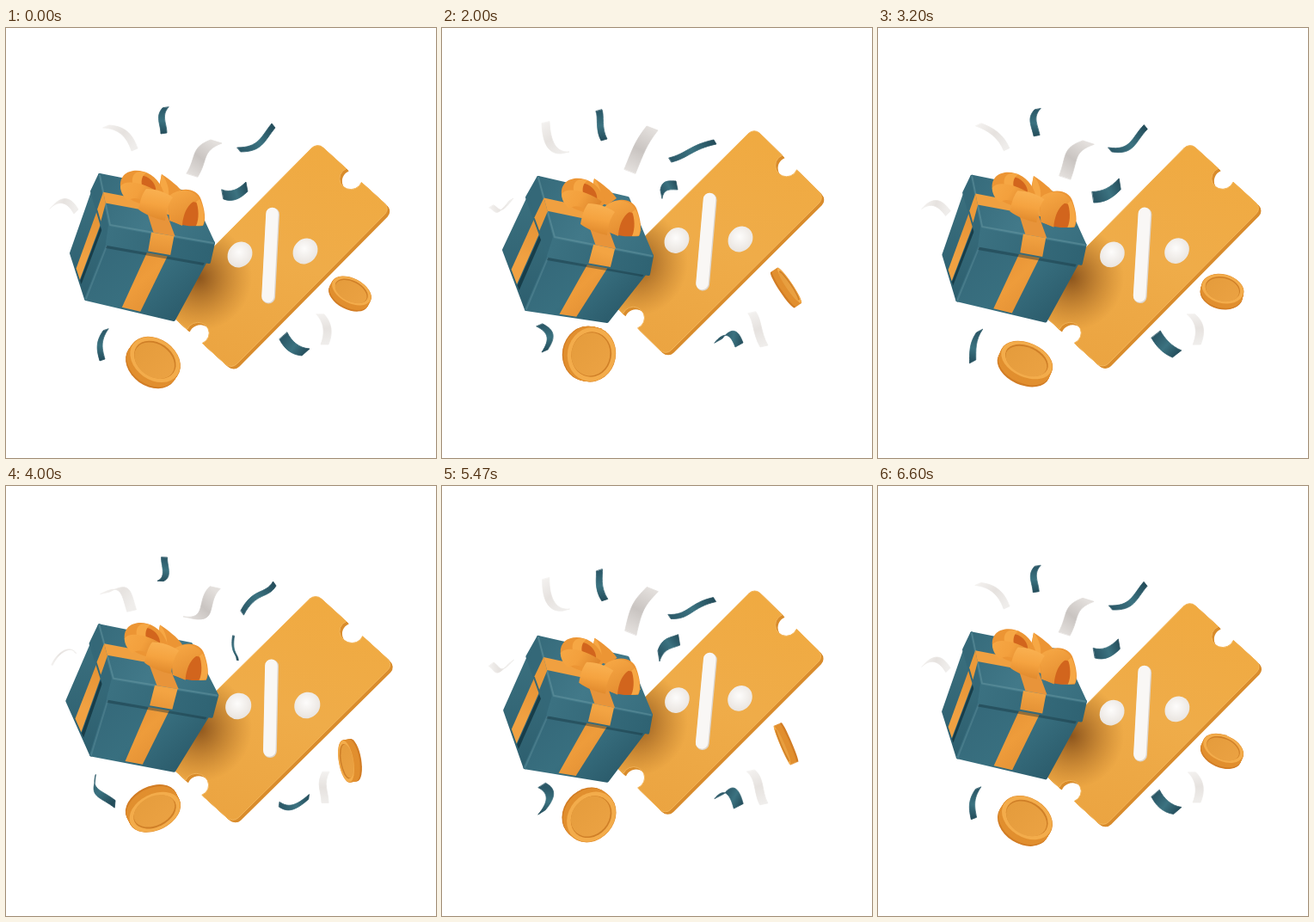
These frames come from a looping animation (500 by 500 pixels, 6.63 s). An HTML page with a canvas:

```html
<!DOCTYPE html>
<html lang="en">
<head>
<meta charset="utf-8">
<title>Gift and coupon</title>
<style>
html, body { margin: 0; width: 100%; height: 100%; overflow: hidden; background: #fff }
canvas { display: block; width: 100vw; height: 100vh }
</style>
</head>
<body>
<canvas width="500" height="500"></canvas>
<script>
const c = document.querySelector('canvas').getContext('2d');
const TURN = 3315, TAU = Math.PI * 2;
const A1 = 1200 / TURN * TAU, A2 = 2000 / TURN * TAU;
const c1 = Math.cos(A1) - 1, s1 = Math.sin(A1), c2 = Math.cos(A2) - 1, s2 = Math.sin(A2);
const det = c1 * s2 - s1 * c2;
let phase = 0, k0 = 1, k1 = 0, k2 = 0;

// Every part swings as one sine wave per turn, set by its poses at 0, 1200 and 2000 ms.
function setPhase(t) {
  phase = t / TURN * TAU;
  const x = Math.cos(phase) - 1, y = Math.sin(phase);
  k1 = (x * s2 - y * c2) / det;
  k2 = (c1 * y - s1 * x) / det;
  k0 = 1 - k1 - k2;
}
const pose = (a, b, d) => a.map((v, i) => v * k0 + b[i] * k1 + d[i] * k2);
const mix = (p, q, f) => [p[0] + (q[0] - p[0]) * f, p[1] + (q[1] - p[1]) * f];

function ramp(x0, y0, x1, y1, ...colors) {
  const g = c.createLinearGradient(x0, y0, x1, y1);
  colors.forEach((col, i) => g.addColorStop(i / (colors.length - 1), col));
  return g;
}
function glow(x, y, r, from, to) {
  const g = c.createRadialGradient(x, y, 0, x, y, r);
  g.addColorStop(0, from);
  g.addColorStop(1, to);
  return g;
}
function poly(fill, pts, round = 0) {
  c.beginPath();
  pts.forEach(p => c.lineTo(p[0], p[1]));
  c.closePath();
  c.fillStyle = c.strokeStyle = fill;
  c.fill();
  if (round) { c.lineWidth = round; c.stroke(); }
}

const TEAL = ['#2b5867', '#3b7280', '#234c5a'];
const PALE = ['#f3f1ef', '#e6e2df', '#efedeb'];
const GREY = ['#e4e0dd', '#c9c4c1', '#e3dfdc'];

// A bent strip: four curve points, then the vector across its width.
function strip(colors, ...poses) {
  const p = pose(...poses), [x, y] = p.slice(8);
  c.beginPath();
  c.moveTo(p[0], p[1]);
  c.bezierCurveTo(p[2], p[3], p[4], p[5], p[6], p[7]);
  c.lineTo(p[6] + x, p[7] + y);
  c.bezierCurveTo(p[4] + x, p[5] + y, p[2] + x, p[3] + y, p[0] + x, p[1] + y);
  c.closePath();
  c.fillStyle = c.strokeStyle = ramp(p[0], p[1], p[6], p[7], ...colors);
  c.fill();
  c.lineWidth = .8;
  c.stroke();
}

function confetti() {
  strip(TEAL, [182,93, 173,103, 180,112, 180,123, 7,-1], [179,84, 185,92, 187,108, 178,113, 7,0], [179,97, 182,104, 178,118, 185,131, 7,-2]);
  strip(PALE, [113,116, 130,117, 140,125, 146,143, 7,-3], [111,124, 128,121, 126,134, 137,148, 12,-2], [116,111, 117,135, 124,147, 139,146, 9,-2]);
  strip(GREY, [210,169, 222,150, 214,139, 238,130, 13,4], [207,148, 236,152, 226,128, 237,108, 12,3], [212,164, 222,140, 224,132, 238,114, 13,5]);
  strip(TEAL, [269,139, 294,139, 296,127, 309,111, 4,5], [271,151, 282,119, 298,131, 314,120, 3,5], [264,151, 284,146, 288,136, 316,130, 3,5]);
  strip(TEAL, [251,188, 261,192, 270,188, 279,179, 2,11], [266,173, 258,187, 265,190, 264,204, 2,-1], [254,188, 256,176, 264,178, 272,178, 2,10]);
  strip(PALE, [51,210, 60,201, 70,200, 79,216, 5,-5], [55,207, 62,196, 72,194, 80,185, 1,2], [55,209, 63,213, 62,222, 78,201, 5,-3]);
  strip(TEAL, [113,352, 103,366, 106,376, 109,387, 6,-2], [102,332, 108,347, 122,345, 132,359, -1,9], [110,347, 124,354, 126,362, 116,377, 7,-3]);
  strip(TEAL, [327,354, 332,364, 340,372, 353,373, -9,8], [317,372, 330,366, 338,364, 351,354, 0,4], [326,361, 338,346, 345,352, 350,366, -9,5]);
  strip(PALE, [361,333, 372,345, 370,358, 366,368, 9,0], [366,332, 355,346, 362,352, 369,370, 8,-1], [356,332, 363,342, 361,355, 370,371, 9,-2]);
}

function ticketPath(shift) {
  const W = 264, H = 116, R = 9, N = 13, dip = 5;
  const half = Math.sqrt(N * N - dip * dip), a = Math.acos(dip / N);
  c.beginPath();
  c.moveTo(R + shift, 0);
  c.arcTo(W, 0, W, H, R);
  c.lineTo(W, H / 2 - half - 4);
  c.arc(W - dip, H / 2, N, -a, a, true);
  c.lineTo(W, H / 2 + half + 4);
  c.arcTo(W, H, 0, H, R);
  c.arcTo(0, H, 0, 0, R);
  c.lineTo(0, H / 2 + half + 4);
  c.arc(dip, H / 2, N, Math.PI - a, Math.PI + a, true);
  c.lineTo(0, H / 2 - half - 4);
  c.arcTo(0, 0, W, 0, R);
  c.closePath();
}

function ticket() {
  const [tx, ty, rx, ry, bx, by] = pose([363,134, 448,211, 263,398], [361,117, 451,202, 264,385], [364,117, 446,198, 261,382]);
  const place = d => {
    c.save();
    c.transform((bx - rx) / 264, (by - ry) / 264, (rx - tx) / 116, (ry - ty) / 116, tx + d, ty + d);
    ticketPath(0);
    c.restore();
  };
  for (let d = 2; d > -1; d -= .5) {
    place(d);
    c.fillStyle = '#d98c2c';
    c.fill();
  }
  place(-1);
  c.fillStyle = ramp(tx, ty, bx, by, '#f0aa41', '#efac49', '#eba441');
  c.fill();
  c.strokeStyle = '#f4b65a';
  c.lineWidth = 1;
  c.stroke();
  c.save();
  c.clip();
  c.fillStyle = glow(224, ty + 156, 62, 'rgba(105,55,15,.75)', 'rgba(150,85,20,0)');
  c.fillRect(140, 150, 200, 260);
  c.restore();

  const [x0, y0, x1, y1] = pose([309.5,216, 304.5,312], [309,200, 305.5,300], [311,199, 302.5,297]);
  c.lineCap = 'round';
  for (const [w, col, d] of [[15.5, '#ddd5cc', .8], [14.5, '#f9f7f5', 0]]) {
    c.lineWidth = w;
    c.strokeStyle = col;
    c.beginPath();
    c.moveTo(x0 + d, y0 + d);
    c.lineTo(x1 + d, y1 + d);
    c.stroke();
  }
  const [ax, ay, ex, ey, tilt] = pose([272,263.5, 348,259.5, .9], [270.5,247.5, 350,248, .2], [273,247, 347,245.5, .9]);
  for (const [x, y] of [[ax, ay], [ex, ey]]) {
    c.beginPath();
    c.ellipse(x, y, 15.8 - tilt * .2, 15 - tilt * 1.5, -.9, 0, TAU);
    c.fillStyle = glow(x - 1, y - 3, 18, '#fdfcfb', '#e9e4df');
    c.fill();
  }
}

// A disc whose normal turns in the plane of u and v, edge-on at the given time.
function coin(x, y, r, edge, u, v) {
  const a = phase - edge / TURN * TAU;
  let n = u.map((q, i) => q * Math.cos(a) + v[i] * Math.sin(a));
  if (n[2] < 0) n = n.map(q => -q);
  const spin = Math.atan2(n[1], n[0]) + Math.PI / 2, flat = Math.max(n[2], .01);
  const disc = (d, s, fill) => {
    c.beginPath();
    c.ellipse(x + n[0] * d, y + n[1] * d, r * s, r * s * flat, spin, 0, TAU);
    c.fillStyle = fill;
    c.fill();
  };
  const h = r * .19;
  for (let i = 0; i <= 12; i++) disc(h * (i / 6 - 1), 1, i < 3 ? '#d27d25' : '#e18f2f');
  disc(h, .98, '#f3ac4b');
  disc(h, .82, '#cf7f27');
  disc(h * .7, .79, ramp(x - r, y - r, x + r, y + r, '#e39a3a', '#eda445'));
}

function bowPart(shift1, shift2, layers) {
  const [x, y] = pose([0, 0], shift1, shift2);
  c.save();
  c.translate(x, y);
  for (const [fill, d] of layers) {
    c.fillStyle = fill;
    c.fill(new Path2D(d));
  }
  c.restore();
}

function bow() {
  const light = '#f6a744', mid = '#ec9534', deep = '#d2651d';
  bowPart([-4,-7], [-4,5], [
    [mid, 'M181 170C190 176 201 184 207 193L196 201L176 194Z'],
    [light, 'M181 170C179 178 179 185 181 194L189 197C190 188 188 178 181 170Z']
  ]);
  bowPart([8,-3], [6,9], [
    [mid, 'M133 184C132 169 146 163 160 167C172 170 181 181 184 194L172 207C160 207 134 199 133 184Z'],
    [deep, 'M148 180C150 170 161 169 169 177C174 182 175 188 174 193C166 188 158 182 148 180Z'],
    [light, 'M147 180C146 171 150 167 157 167L164 168C158 171 157 177 158 183Z'],
    [ramp(134, 180, 172, 204, light, '#f3a03d', '#dd852b'), 'M133 184C140 174 166 182 180 193L168 208C157 197 148 196 142 201C136 196 133 190 133 184Z']
  ]);
  bowPart([4,1], [0,12], [
    [mid, 'M188 198C197 185 222 183 227 200C231 211 233 224 229 230C216 231 204 229 190 224Z'],
    [deep, 'M193 224C195 208 207 199 222 203C228 212 228 225 221 230C211 231 200 229 193 224Z'],
    [ramp(195, 190, 212, 225, light, '#e58e31'), 'M188 197C198 186 218 185 225 200C214 200 206 213 205 230L191 224Z'],
    [light, 'M225 199C230 208 232 222 229 229L221 230C225 222 224 208 221 202Z']
  ]);
  bowPart([11,2], [7,17], [
    [ramp(172, 188, 166, 221, '#f9b050', '#f5a340', '#e18a2d'), 'M163 187C174 187 186 191 194 197C188 205 186 214 185 224C174 222 162 217 154 211C156 201 158 193 163 187Z']
  ]);
}

function gift() {
  const A = pose([109,171], [110,163], [112,174]), B = pose([121,229], [130,230], [131,243]);
  const C = pose([241,250], [247,250], [244,265]), D = pose([214,192], [216,186], [216,198]);
  const A2 = pose([100,190], [98,186], [99,197]), B2 = pose([118,251], [122,253], [124,265]);
  const C2 = pose([236,272], [241,274], [240,286]);
  const E = pose([76,262], [69,247], [72,258]), F = pose([93,315], [102,318], [98,327]);
  const G = pose([195,339], [194,331], [192,341]);
  const A3 = mix(A2, B2, .03), B3 = mix(B2, F, .01), C3 = mix(C2, B2, .035);
  const band = (fill, p, q, r, s, f, g) =>
    poly(fill, [mix(p, q, f), mix(p, q, g), mix(r, s, g), mix(r, s, f)]);

  c.lineJoin = 'round';
  poly(ramp(...A2, ...F, '#3a6f7e', '#2d5f6f'), [A3, B3, F, E], 4);
  poly(ramp(...B2, ...G, '#35697a', '#386f7f', '#2c5d6d'), [B3, C3, G, F], 4);
  c.strokeStyle = 'rgba(103,152,163,.35)';
  c.lineWidth = 2;
  c.beginPath();
  c.moveTo(...B3);
  c.lineTo(...F);
  c.stroke();
  band('#173d49', A3, B3, E, F, .6, .68);
  band(ramp(...A2, ...E, '#e18d30', '#f0a142'), A3, B3, E, F, .33, .58);
  band(ramp(...B2, ...G, '#e18b30', '#ee9c3b', '#dc8a31'), B3, C3, F, G, .41, .62);
  band('rgba(20,48,58,.35)', B3, C3, F, G, 0, 0);
  poly('rgba(18,46,56,.4)', [B3, C3, mix(C3, G, .07), mix(B3, F, .07)]);

  poly('#346878', [A, B, B2, A2], 4);
  poly(ramp(...B, ...C2, '#3b7181', '#2f6373'), [B, C, C2, B2], 4);
  poly(ramp(...A, ...C, '#366b7b', '#427989', '#386e7e'), [A, B, C, D], 4);
  c.strokeStyle = 'rgba(112,160,170,.4)';
  c.lineWidth = 2;
  c.beginPath();
  c.moveTo(...A);
  c.lineTo(...B);
  c.lineTo(...C);
  c.stroke();
  band('#f0a040', A, B, D, C, .34, .56);
  band('#eb9a3a', A, B, A2, B2, .34, .57);
  band('#e8943a', B, C, A, D, .42, .63);
  band(ramp(...B, ...B2, '#f3a443', '#e69437'), B, C, B2, C2, .4, .62);
  bow();
}

function draw(now) {
  setPhase(now % TURN);
  c.fillStyle = '#fff';
  c.fillRect(0, 0, 500, 500);
  confetti();
  ticket();
  gift();
  const [y1, y2] = pose([389, 309], [369, 317], [379, 302]);
  coin(171, y1, 32, 1130, [0, -1, 0], [.45, 0, .89]);
  coin(400, y2, 25, 2100, [.88, -.45, 0], [.3, .55, -.78]);
}

const start = performance.now();
function tick() {
  draw(performance.now() - start);
  requestAnimationFrame(tick);
}
tick();
</script>
</body>
</html>
```
